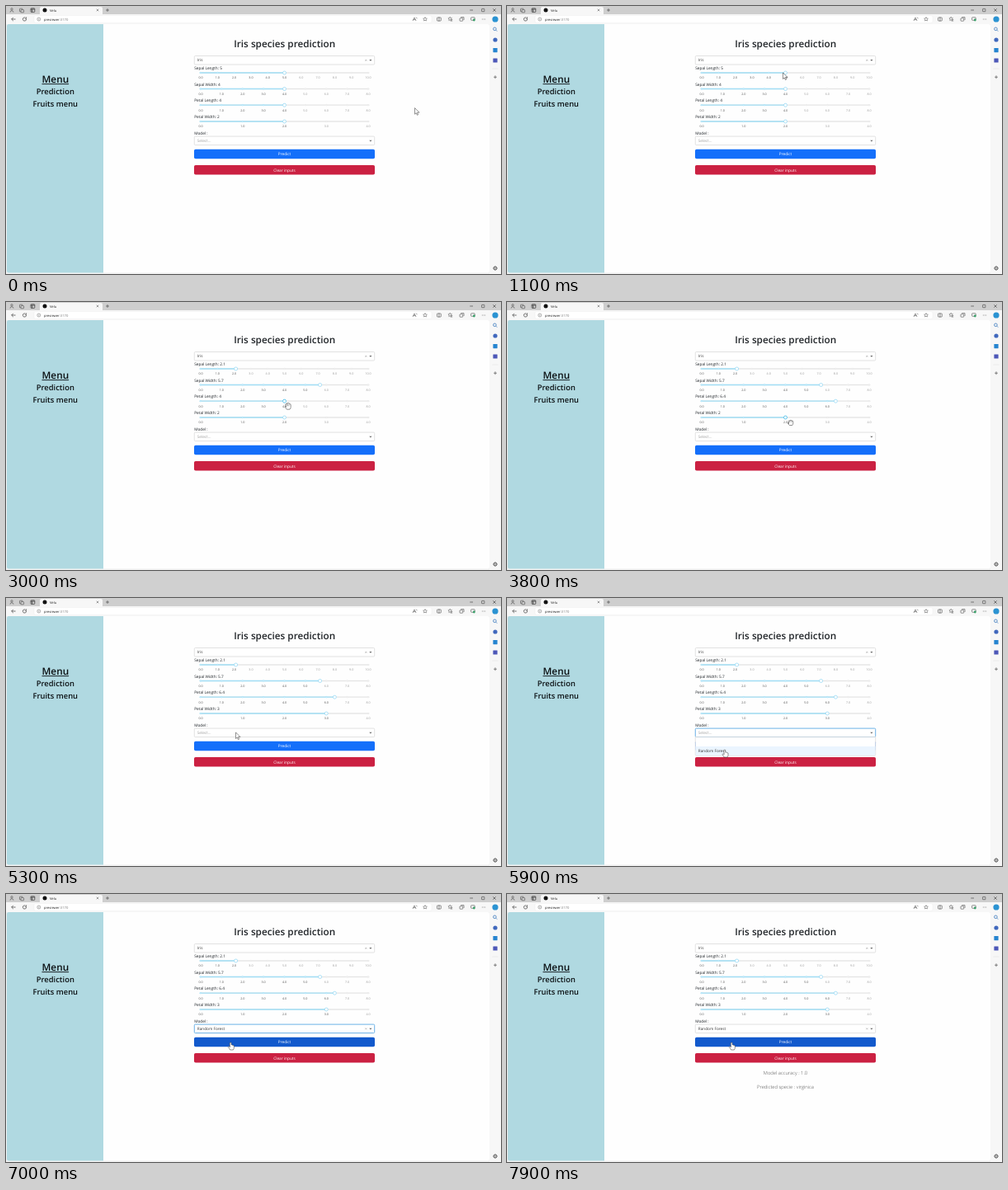
An HTML page with a canvas for the animation above (8000 ms loop, 600 by 325 pixels).

```html
<!DOCTYPE html>
<html lang="en">
<head>
<meta charset="utf-8">
<title>Iris species prediction</title>
<style>
  html, body { margin: 0; width: 100%; height: 100%; overflow: hidden; background: #fff; }
  canvas { display: block; width: 600px; height: 325px; }
</style>
</head>
<body>
<canvas id="stage"></canvas>
<script>
const W = 600, H = 325, LOOP = 8000;
const canvas = document.getElementById('stage');
const ratio = window.devicePixelRatio || 1;
canvas.width = W * ratio;
canvas.height = H * ratio;
const c = canvas.getContext('2d');
const FONT = '"Open Sans", "Noto Sans", sans-serif';
const INK = '#1d2227', ICON = '#4a4a4a', MENU_INK = '#0b1013';
const X0 = 236, X1 = 439;
const OPEN = 5500, CHOSEN = 6100, HOVER = 6600, RESULT = 7400;

// Each slider is dragged once, between start and end
const sliders = [
  { name: 'Sepal Length', y: 81, max: 10, from: 5, to: 2.1, start: 1250, end: 1700 },
  { name: 'Sepal Width', y: 100.5, max: 8, from: 4, to: 5.7, start: 2300, end: 2700 },
  { name: 'Petal Length', y: 120.2, max: 8, from: 4, to: 6.4, start: 3050, end: 3450 },
  { name: 'Petal Width', y: 140, max: 4, from: 2, to: 3, start: 3900, end: 4400 }
];

// time, x, y, cursor shape from that time on
const path = [
  [0, 495.5, 124, 'arrow'], [300, 495.5, 124, 'arrow'],
  [1000, 334.5, 81.3, 'arrow'], [1130, 334.5, 81.3, 'arrow'],
  [1200, 341, 86.5, 'grab'], [1250, 341, 86.5, 'fist'],
  [1700, 282.5, 86.5, 'arrow'], [2100, 341.7, 106.8, 'grab'],
  [2300, 341.7, 106.8, 'fist'], [2700, 384.8, 106.8, 'arrow'],
  [3000, 341.7, 126, 'grab'], [3050, 341.7, 126, 'fist'],
  [3450, 402.6, 126, 'arrow'], [3700, 343.7, 146, 'fist'],
  [3900, 343.7, 146, 'fist'], [4400, 394.5, 146, 'arrow'],
  [4600, 392, 146, 'arrow'], [5200, 278.5, 163.3, 'arrow'],
  [5550, 278.5, 163.3, 'point'], [5950, 263.2, 184.8, 'point'],
  [6400, 263.2, 184.8, 'point'], [6900, 272.2, 179.8, 'point'],
  [LOOP, 272.2, 179.8, 'point']
];

const clamp = v => Math.max(0, Math.min(1, v));
const ease = v => v * v * (3 - 2 * v);
const span = (t, a, b) => ease(clamp((t - a) / (b - a)));

function text(s, x, y, size, color = INK, weight = 400, align = 'left') {
  c.font = `${weight} ${size}px ${FONT}`;
  c.textAlign = align;
  c.fillStyle = color;
  c.fillText(s, x, y);
}

function rect(x, y, w, h, color) {
  c.fillStyle = color;
  c.fillRect(x, y, w, h);
}

function paint(fill, stroke, width) {
  if (fill) { c.fillStyle = fill; c.fill(); }
  if (stroke) { c.strokeStyle = stroke; c.lineWidth = width; c.stroke(); }
}

function box(x, y, w, h, r, fill, stroke, width = 0.5) {
  c.beginPath();
  c.roundRect(x, y, w, h, r);
  paint(fill, stroke, width);
}

function disc(x, y, r, fill, stroke, width = 0.6) {
  c.beginPath();
  c.arc(x, y, r, 0, Math.PI * 2);
  paint(fill, stroke, width);
}

function lines(color, width, ...runs) {
  c.strokeStyle = color;
  c.lineWidth = width;
  c.beginPath();
  for (const p of runs)
    for (let i = 0; i < p.length; i += 2)
      i ? c.lineTo(p[i], p[i + 1]) : c.moveTo(p[i], p[i + 1]);
  c.stroke();
}

function cross(x, y, r, color, width) {
  lines(color, width, [x - r, y - r, x + r, y + r], [x + r, y - r, x - r, y + r]);
}

function plus(x, y, r) {
  lines(ICON, 0.65, [x - r, y, x + r, y], [x, y - r, x, y + r]);
}

function star(x, y, r) {
  c.beginPath();
  for (let i = 0; i < 10; i++) {
    const a = -Math.PI / 2 + i * Math.PI / 5, d = i % 2 ? r * 0.48 : r;
    c.lineTo(x + d * Math.cos(a), y + d * Math.sin(a));
  }
  c.closePath();
  paint(null, ICON, 0.5);
}

function tabBar() {
  rect(0, 0, W, 11, '#cecece');
  disc(7, 3.8, 1.2, null, ICON);
  c.beginPath();
  c.arc(7, 7.7, 2, Math.PI, 0);
  c.stroke();
  box(16.5, 3.2, 3.6, 3.6, 0.6, null, ICON, 0.6);
  box(18, 4.6, 3.6, 3.2, 0.6, '#cecece', ICON, 0.6);
  box(30, 2.8, 4.8, 4.6, 0.7, null, '#333', 0.7);
  lines('#333', 0.8, [30, 4, 34.8, 4], [31.6, 4, 31.6, 7.4]);
  box(41, 1, 76, 12, [2, 2, 0, 0], '#f7f7f7');
  disc(47, 5, 2.5, '#111');
  text('Velu', 53, 6.5, 4.1, '#222');
  cross(111, 5, 1.3, '#555', 0.55);
  plus(123, 5, 1.9);
  lines('#333', 0.6, [562.3, 5, 566, 5]);
  box(576.6, 3.4, 3.3, 3.3, 0.4, null, '#333', 0.55);
  cross(592, 5, 1.7, '#333', 0.6);
}

function toolBar() {
  rect(0, 10, W, 12, '#f7f7f7');
  lines(ICON, 0.75, [11.6, 16, 6.7, 16], [8.8, 13.9, 6.7, 16, 8.8, 18.1]);
  c.beginPath();
  c.arc(22.5, 16, 2.1, -0.2, Math.PI * 1.65);
  c.stroke();
  lines(ICON, 0.7, [24.6, 13.4, 24.6, 15.2, 22.8, 15.2]);
  box(34, 11.5, 482, 9, 2, '#fff', '#ebebeb', 0.4);
  disc(39.8, 16, 2, null, '#666', 0.5);
  lines('#666', 0.5, [39.8, 15.6, 39.8, 17.1], [39.8, 14.8, 39.8, 15.2]);
  text('previewer', 46, 17.5, 4.1, '#222');
  text(':3170', 46 + c.measureText('previewer').width, 17.5, 4.1, '#777');
  lines(ICON, 0.6, [493, 17.9, 495, 14, 497, 17.9], [493.7, 16.6, 496.3, 16.6], [497.2, 13.7, 498.3, 15.2]);
  star(508, 16, 2.5);
  box(522.5, 14, 4.8, 4, 0.6, null, ICON, 0.6);
  lines(ICON, 0.6, [524.9, 13.5, 524.9, 18.5]);
  star(538.2, 15.6, 2.4);
  lines(ICON, 0.6, [538.6, 18, 541.2, 18], [539.8, 16.5, 541.2, 16.5]);
  box(550, 14.8, 3.7, 3.4, 0.5, null, ICON, 0.6);
  lines(ICON, 0.6, [551.2, 13.6, 555, 13.6, 555, 17]);
  box(563.6, 13.8, 4.6, 3.5, 0.6, null, ICON, 0.6);
  disc(567.3, 17, 1.4, '#38a169');
  for (let i = -1; i < 2; i++) disc(579 + i * 1.8, 16, 0.45, ICON);
}

function sideBar() {
  rect(586, 10, 14, 315, '#f7f7f7');
  disc(593, 16, 3.6, '#2b93d2');
  disc(592.4, 27.8, 1.8, null, '#3475bb', 0.8);
  lines('#3475bb', 0.8, [593.8, 29.2, 595.2, 30.6]);
  disc(593, 41, 2.6, '#4068bd');
  box(590.4, 51, 5.2, 5.2, 0.4, '#2584d0');
  box(590.4, 63.4, 5.2, 5.2, 0.4, '#4c57b8');
  lines('#ddd', 0.5, [589.5, 76, 596.5, 76]);
  plus(593, 86.2, 1.9);
  disc(593, 318, 1.9, null, ICON, 0.8);
  disc(593, 318, 0.7, null, ICON, 0.4);
  for (let i = 0; i < 8; i++) {
    const a = i * Math.PI / 4, x = Math.cos(a), y = Math.sin(a);
    lines(ICON, 0.8, [593 + x * 2, 318 + y * 2, 593 + x * 2.7, 318 + y * 2.7]);
  }
}

function menu() {
  box(1, 22, 117, 301.5, [2, 0, 0, 2], '#b0d9e1');
  text('Menu', 59.8, 92.6, 11.8, MENU_INK, 600, 'center');
  rect(43.5, 94.2, 32.6, 0.9, MENU_INK);
  text('Prediction', 59.8, 107.3, 9.4, MENU_INK, 600, 'center');
  text('Fruits menu', 59.8, 122.1, 9.4, MENU_INK, 600, 'center');
}

function dropdown(y, label, filled, focus) {
  box(228.3, y + 0.2, 218.4, 10.5, 1.2, '#fff', focus ? '#5ba9e4' : '#cfcfcf', focus ? 0.9 : 0.6);
  text(label, 231.8, y + 7, 4.7, label === 'Select...' ? '#a0a0a0' : '#333');
  if (filled) cross(436.3, y + 5.5, 0.9, '#888', 0.5);
  c.beginPath();
  c.moveTo(440.3, y + 4.8);
  c.lineTo(443.5, y + 4.8);
  c.lineTo(441.9, y + 6.5);
  paint('#666');
}

// Open list of the model dropdown, second row under the pointer
function optionList() {
  box(228.3, 168.6, 218.4, 22.6, [0, 0, 1.2, 1.2], '#fff', '#cfcfcf', 0.6);
  rect(228.6, 180, 217.8, 10.9, '#ebf5ff');
  text('Random Forest', 231.8, 187.1, 4.7, '#333');
}

function slider(s, t) {
  const raw = s.from + (s.to - s.from) * span(t, s.start, s.end);
  const value = Math.round(raw * 10) / 10;
  const at = v => X0 + (X1 - X0) * v / s.max;
  const x = at(value);
  const held = t >= s.start - 100 && t < s.end + 50;
  text(`${s.name}: ${t >= s.end ? s.to : s.from}`, 228.2, s.y - 4, 4.75);
  box(234.5, s.y - 0.65, 206, 1.3, 0.65, '#e6e6e6');
  box(234.5, s.y - 0.65, x - 234.5, 1.3, 0.65, '#a3dff6');
  for (let v = 0; v <= s.max; v++) {
    const on = v <= value;
    disc(at(v), s.y, 0.9, on ? '#d3f0fb' : '#f2f2f2', on ? '#a3dff6' : '#e6e6e6', 0.5);
    text(v.toFixed(1), at(v), s.y + 7.3, 3.7, on ? '#4c4c4c' : '#979797', 400, 'center');
  }
  disc(x, s.y, 2, '#fff', held ? '#55c1ea' : '#8ed6f4', held ? 0.9 : 0.7);
}

function button(y, h, label, color) {
  box(228, y, 219, h, 1.8, color);
  text(label, 337.5, y + h / 2 + 1.7, 4.75, '#fff', 500, 'center');
}

const outlines = {
  arrow: 'M0 0V7.2L1.7 5.7L2.9 8.3L4.1 7.8L2.9 5.2H5.1Z',
  point: 'M-.9 .7Q0-.5 .9 .7V3.2Q1.7 2.7 2.1 3.5Q3 3 3.3 3.9Q4.2 3.7 4.2 4.8V6.5Q4.2 7.8 3.2 9.2H-.6Q-1.4 7.7-2.8 5.7Q-2.7 4.3-.9 5.5Z',
  grab: 'M-2.4 1L-3-1.7Q-2.5-3-1.7-1.8L-1.5-3Q-.8-4.5-.1-3Q.7-4.5 1.3-2.8Q2.2-3.6 2.5-2.1Q3.5-2.3 3.5-1V1.4Q3.4 3 2.3 4.2H-1.4Q-2.5 2.7-3.8 1Q-3.8-.1-2.4 1Z',
  fist: 'M-2.5 1.3V-1.3Q-2.2-2.6-1.2-2.1Q-.6-3.1.3-2.3Q1.1-3 1.6-2Q3-2.3 3.1-.8V1Q3.1 2.5 2.1 3.5H-1.2Q-2.8 2.5-2.9 1Q-3.1.1-2.5 0Z'
};

function drawCursor(t) {
  let i = 0;
  while (i < path.length - 2 && t >= path[i + 1][0]) i++;
  const [t0, ax, ay, kind] = path[i], [t1, bx, by] = path[i + 1];
  const k = span(t, t0, t1);
  c.save();
  c.translate(ax + (bx - ax) * k, ay + (by - ay) * k);
  c.lineJoin = c.lineCap = 'round';
  c.fillStyle = '#fff';
  c.strokeStyle = '#4a4a4a';
  c.lineWidth = 0.6;
  const p = new Path2D(outlines[kind]);
  c.fill(p);
  c.stroke(p);
  if (kind === 'grab') lines('#555', 0.4, [-1.5, -2, -1.2, 0], [-0.1, -2.5, -0.1, -0.2], [1.3, -2.2, 1.2, 0]);
  if (kind === 'fist') lines('#555', 0.4, [-1.1, -1.8, -1.1, -0.6], [0.3, -2, 0.3, -0.7], [1.6, -1.7, 1.6, -0.5]);
  c.restore();
}

function draw(t) {
  c.setTransform(ratio, 0, 0, ratio, 0, 0);
  c.textRendering = 'geometricPrecision';
  c.textBaseline = 'alphabetic';
  rect(0, 0, W, H, '#f0f0f0');
  tabBar();
  toolBar();
  sideBar();
  box(1, 22, 585, 301.5, 2, '#fefefe');
  menu();

  text('Iris species prediction', 337.7, 50, 11.75, '#212529', 600, 'center');
  dropdown(60.3, 'Iris', true, false);
  for (const s of sliders) slider(s, t);
  text('Model :', 228.2, 155.7, 4.75);
  const chosen = t >= CHOSEN;
  dropdown(157.9, chosen ? 'Random Forest' : 'Select...', t >= HOVER, t >= OPEN && t < 7200);
  button(173.7, 11.5, 'Predict', t >= HOVER ? '#1259cc' : '#146ffa');
  button(193, 11.6, 'Clear inputs', '#cb2142');
  if (t >= OPEN && !chosen) optionList();
  if (t >= RESULT) {
    text('Model accuracy : 1.0', 337.5, 219.2, 5.85, '#444', 300, 'center');
    text('Predicted specie : virginica', 337.5, 236.2, 5.85, '#444', 300, 'center');
  }
  drawCursor(t);
}

const began = performance.now();
function tick(now) {
  draw(Math.max(0, now - began) % LOOP);
  requestAnimationFrame(tick);
}
draw(0);
requestAnimationFrame(tick);
</script>
</body>
</html>
```
